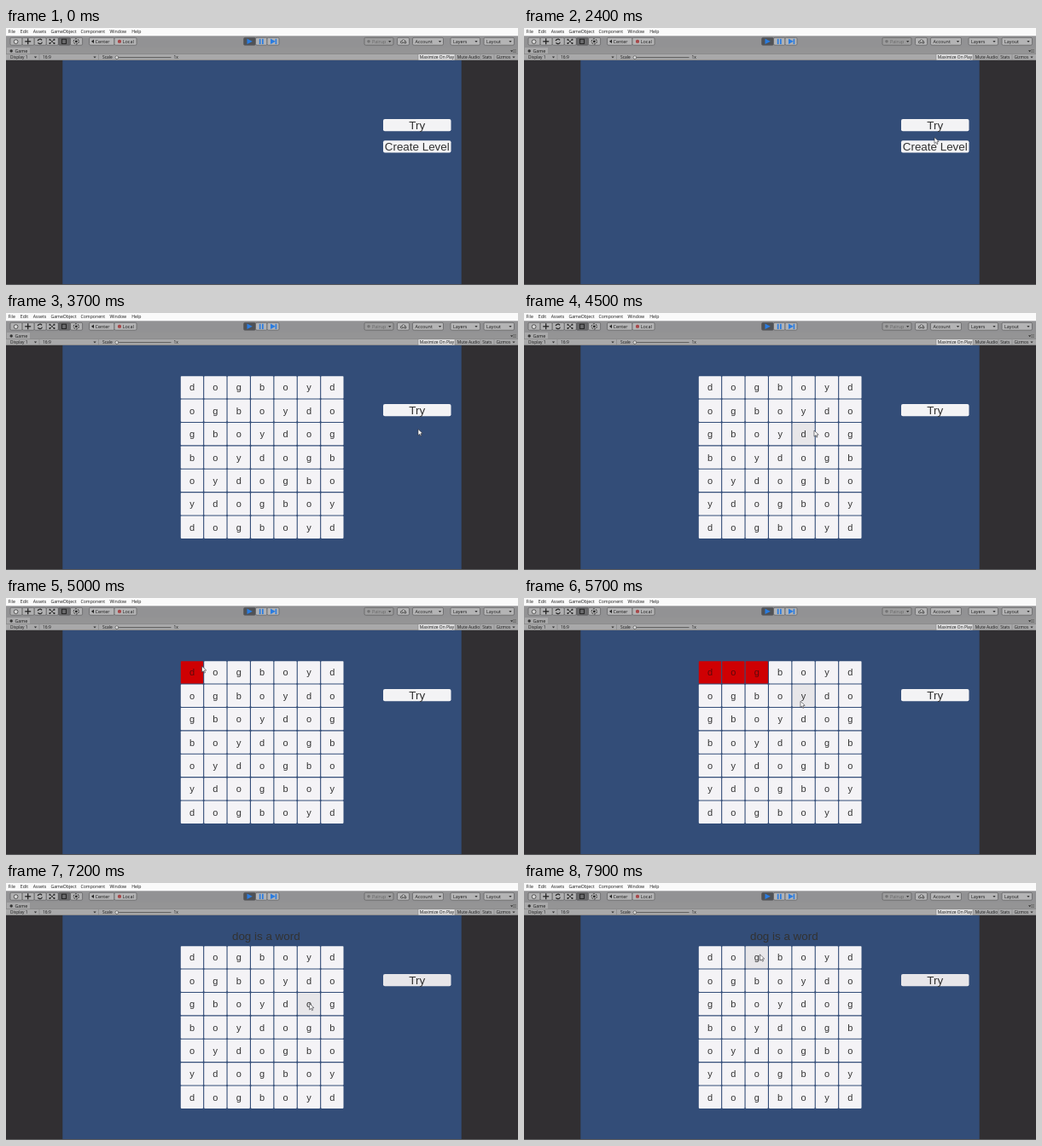
An HTML page with a canvas for the animation above (8000 ms loop, 600 by 302 pixels).

```html
<!DOCTYPE html>
<html lang="en">
<head>
<meta charset="utf-8">
<title>Word grid</title>
<style>
html, body { margin: 0; width: 100%; height: 100%; overflow: hidden; background: #312f32; }
canvas { display: block; width: 600px; height: 302px; }
</style>
</head>
<body>
<canvas id="stage"></canvas>
<script>
const canvas = document.getElementById('stage');
const ctx = canvas.getContext('2d');
const ratio = window.devicePixelRatio || 1;
canvas.width = 600 * ratio;
canvas.height = 302 * ratio;

const LOOP = 8000, STEP = 100;
const UI = '"Open Sans", "Noto Sans", sans-serif';
const GAME = '"Liberation Sans", Arial, sans-serif';
const INK = '#323232';
const WHITE = '#f3f3f5', HOVER = '#e7e6e9', PRESSED = '#c4c4c6', RED = '#cf0003';

// Pointer path: time, x, y
const path = [
  [1500, 472, 108], [1600, 479, 124], [1700, 481, 128.5], [2600, 481, 128.5],
  [2700, 480, 130], [2800, 479, 152], [3000, 476, 189], [3200, 480, 178],
  [3500, 484, 149], [3600, 483, 136.5], [3800, 483, 136.5],
  [4000, 528, 162], [4200, 470, 158], [4500, 340, 138], [4700, 262, 112],
  [4900, 221, 88], [5000, 229.5, 80], [5200, 246, 88], [5400, 273, 87],
  [5600, 281, 113], [5900, 410, 138], [6100, 455, 114], [6300, 453.5, 112],
  [6500, 449, 116], [6800, 410, 174], [7100, 365, 152], [7400, 337, 121],
  [7700, 290, 95], [7900, 276.5, 84]
];

// Cells picked in the top row, by time
const picks = [4900, 5200, 5500];
const OPEN_AT = 3700, TRY_DOWN = 6100, RESULT_AT = 6200;

const grid = { x: 204.8, y: 74.2, pitch: 27.4, size: 26.3, n: 7, word: 'dogboy' };
const tryBox = [442, 107, 79.5, 14.3], createBox = [442, 132.3, 79.5, 14.3];

function rect(x, y, w, h, fill) {
  ctx.fillStyle = fill;
  ctx.fillRect(x, y, w, h);
}

function round(x, y, w, h, r, fill, edge) {
  ctx.beginPath();
  ctx.roundRect(x, y, w, h, r);
  ctx.fillStyle = fill;
  ctx.fill();
  if (edge) {
    ctx.strokeStyle = edge;
    ctx.lineWidth = 0.7;
    ctx.stroke();
  }
}

function text(str, x, y, size, color = '#161616', font = UI, align = 'left') {
  ctx.font = `${size}px ${font}`;
  ctx.fillStyle = color;
  ctx.textAlign = align;
  ctx.fillText(str, x, y);
}

function line(points, color, width = 1) {
  ctx.beginPath();
  points.forEach(([x, y]) => ctx.lineTo(x, y));
  ctx.strokeStyle = color;
  ctx.lineWidth = width;
  ctx.stroke();
}

function poly(points, fill) {
  ctx.beginPath();
  points.forEach(([x, y]) => ctx.lineTo(x, y));
  ctx.closePath();
  ctx.fillStyle = fill;
  ctx.fill();
}

function disc(x, y, r, fill) {
  ctx.beginPath();
  ctx.arc(x, y, r, 0, 7);
  ctx.fillStyle = fill;
  ctx.fill();
}

const caret = (x, y) => poly([[x - 1.6, y - 0.8], [x + 1.6, y - 0.8], [x, y + 1.2]], '#333');

function toolButton(x, w, fill = '#b4b4b5') {
  round(x, 11.3, w, 8.9, 1.5, fill, '#5c5c5e');
}

function drawMenu() {
  rect(0, 0, 600, 10, '#fafafa');
  const items = { File: 2.6, Edit: 16.8, Assets: 31.8, GameObject: 52.4, Component: 87.4, Window: 121.4, Help: 147.2 };
  for (const name in items) text(name, items[name], 6.3, 5.2);
}

function drawTools() {
  for (let i = 0; i < 6; i++) toolButton(5 + i * 14.1, 14.1, i === 4 ? '#69696b' : '#b0b0b1');
  const ink = '#242424';
  // hand
  round(9.3, 13.8, 4.6, 4.6, 2, '#d8d8d8', ink);
  // move
  line([[22.2, 15.8], [29.2, 15.8]], ink, 1.3);
  line([[25.7, 12.3], [25.7, 19.3]], ink, 1.3);
  // rotate
  for (const a of [0.3, 3.4]) {
    ctx.beginPath();
    ctx.arc(39.8, 15.8, 2.7, a, a + 2.3);
    ctx.strokeStyle = ink;
    ctx.lineWidth = 1.2;
    ctx.stroke();
  }
  // scale
  line([[51.2, 13.2], [56.6, 18.4]], ink, 0.8);
  line([[56.6, 13.2], [51.2, 18.4]], ink, 0.8);
  for (const x of [50.5, 55.6]) for (const y of [12.8, 17]) rect(x, y, 1.8, 1.8, ink);
  // rect
  ctx.strokeStyle = '#1c1c1c';
  ctx.lineWidth = 0.9;
  ctx.strokeRect(65.5, 13.2, 5, 5.2);
  // transform
  disc(82.3, 15.8, 1.4, ink);
  ctx.beginPath();
  ctx.arc(82.3, 15.8, 3.1, 0, 7);
  ctx.setLineDash([2, 1.2]);
  ctx.stroke();
  ctx.setLineDash([]);

  toolButton(97.5, 29.5);
  toolButton(127, 26);
  poly([[100, 15.8], [103, 13.6], [103, 18]], ink);
  text('Center', 104.6, 17.8, 5.4);
  round(131, 13.7, 4, 4, 1.5, '#a8484a');
  text('Local', 136.8, 17.8, 5.4);
}

function drawPlay() {
  toolButton(278.5, 14, '#505256');
  toolButton(292.5, 13.5, '#b0b2b6');
  toolButton(306, 14, '#b0b2b6');
  const blue = '#2a7ce0';
  poly([[282.5, 12.6], [288.8, 15.8], [282.5, 19]], blue);
  rect(296.8, 12.8, 1.7, 6.2, blue);
  rect(300, 12.8, 1.7, 6.2, blue);
  poly([[310, 12.6], [315.8, 15.8], [310, 19]], blue);
  rect(315.6, 12.8, 1.6, 6.2, blue);
}

function drawAccount() {
  toolButton(420, 34, '#9c9c9d');
  disc(425, 15.8, 1.8, '#747475');
  text('Pairup', 429, 17.8, 5.4, '#666');
  caret(449.7, 15.8);
  toolButton(458.5, 14);
  const puffs = [[463.7, 16.6, 1.6], [465.7, 15.4, 2], [467.8, 16.7, 1.5]];
  for (const [x, y, r] of puffs) disc(x, y, r, '#333');
  for (const [x, y, r] of puffs) disc(x, y, r - 0.7, '#c4c4c4');
  toolButton(476.5, 36);
  text('Account', 479.5, 17.8, 5.4);
  caret(508.5, 15.8);
  toolButton(521, 34.5);
  text('Layers', 524, 17.8, 5.4);
  caret(551, 15.8);
  toolButton(560, 35.5);
  text('Layout', 563, 17.8, 5.4);
  caret(591, 15.8);
}

function drawTabs() {
  rect(0, 23, 600, 7.5, '#949495');
  rect(1, 23, 27, 7.5, '#a9a9aa');
  disc(6.2, 27, 1.7, '#333');
  text('Game', 10.4, 29, 5.4);
  for (const y of [25.5, 27, 28.5]) line([[594, y], [598, y]], '#555', 0.5);
  caret(592.6, 27);

  rect(0, 30.5, 600, 7.5, '#a9a9aa');
  line([[0, 30.5], [600, 30.5]], '#7b7b7b', 0.5);
  line([[0, 37.7], [600, 37.7]], '#6c6c6c', 0.6);
  for (const x of [39, 108.5, 483, 526, 556, 572]) line([[x, 31], [x, 37.4]], '#858585', 0.6);
  const label = (str, x) => text(str, x, 36.1, 4.9);
  label('Display 1', 5);
  caret(34.5, 34.3);
  label('16:9', 43);
  caret(104, 34.3);
  label('Scale', 113);
  line([[130, 34.6], [193.5, 34.6]], '#555', 0.9);
  disc(129.8, 34.6, 2.1, '#555');
  disc(129.8, 34.6, 1.5, '#ddd');
  label('1x', 196.5);
  rect(483.4, 31, 42.2, 6.5, '#dededf');
  label('Maximize On Play', 484.8);
  label('Mute Audio', 528.8);
  label('Stats', 558.2);
  label('Gizmos', 574.4);
  caret(595, 34.3);
}

function drawEditor() {
  drawMenu();
  rect(0, 9.3, 600, 13.7, '#929294');
  drawTools();
  drawPlay();
  drawAccount();
  drawTabs();
  rect(0, 38, 600, 264, '#312f32');
  rect(66.3, 38, 467.4, 263, '#334d78');
  rect(0, 301, 600, 1, '#5a5a5c');
}

function pointerAt(t) {
  if (t < path[0][0]) return null;
  const i = path.findIndex(p => p[0] > t);
  if (i < 0) return path[path.length - 1].slice(1);
  const [t0, x0, y0] = path[i - 1], [t1, x1, y1] = path[i];
  const k = (t - t0) / (t1 - t0);
  return [x0 + (x1 - x0) * k, y0 + (y1 - y0) * k];
}

function inside(p, [x, y, w, h]) {
  return p && p[0] >= x && p[0] < x + w && p[1] >= y && p[1] < y + h;
}

function drawButton(box, label, fill) {
  round(...box, 2, fill);
  text(label, box[0] + box[2] / 2, box[1] + 11.8, 13.4, INK, GAME, 'center');
}

function drawGrid(t, pointer) {
  const { x, y, pitch, size, n, word } = grid;
  for (let r = 0; r < n; r++) {
    for (let c = 0; c < n; c++) {
      const box = [x + c * pitch, y + r * pitch, size, size];
      const picked = r === 0 && t >= picks[c] && t < RESULT_AT;
      const fill = picked ? RED : inside(pointer, box) ? HOVER : '#f4f3f6';
      round(...box, 0.8, fill);
      text(word[(r + c) % word.length], box[0] + size / 2, box[1] + 17.2, 11,
        picked ? '#5c080c' : INK, GAME, 'center');
    }
  }
}

function drawPointer([x, y]) {
  const shape = [[0, 0], [0, 7.2], [1.7, 5.7], [2.9, 8.1], [4, 7.6], [2.9, 5.2], [5.2, 5]];
  const pts = shape.map(([dx, dy]) => [x + dx, y + dy]);
  poly(pts, '#fff');
  line([...pts, pts[0]], '#2a2a30', 0.6);
}

function draw(t) {
  ctx.setTransform(ratio, 0, 0, ratio, 0, 0);
  drawEditor();
  const pointer = pointerAt(t);

  let tryFill = inside(pointer, tryBox) && t > OPEN_AT || t >= RESULT_AT ? HOVER : WHITE;
  if (t >= TRY_DOWN && t < RESULT_AT) tryFill = PRESSED;
  drawButton(tryBox, 'Try', tryFill);

  if (t < OPEN_AT) {
    drawButton(createBox, 'Create Level', t >= OPEN_AT - STEP ? PRESSED : WHITE);
  } else {
    drawGrid(t, pointer);
  }
  if (t >= RESULT_AT) text('dog is a word', 304.8, 66.5, 13.4, INK, GAME, 'center');
  if (pointer) drawPointer(pointer);
}

const start = performance.now();
function tick() {
  const t = (performance.now() - start) % LOOP;
  draw(Math.floor(t / STEP) * STEP);
  requestAnimationFrame(tick);
}
tick();
</script>
</body>
</html>
```
